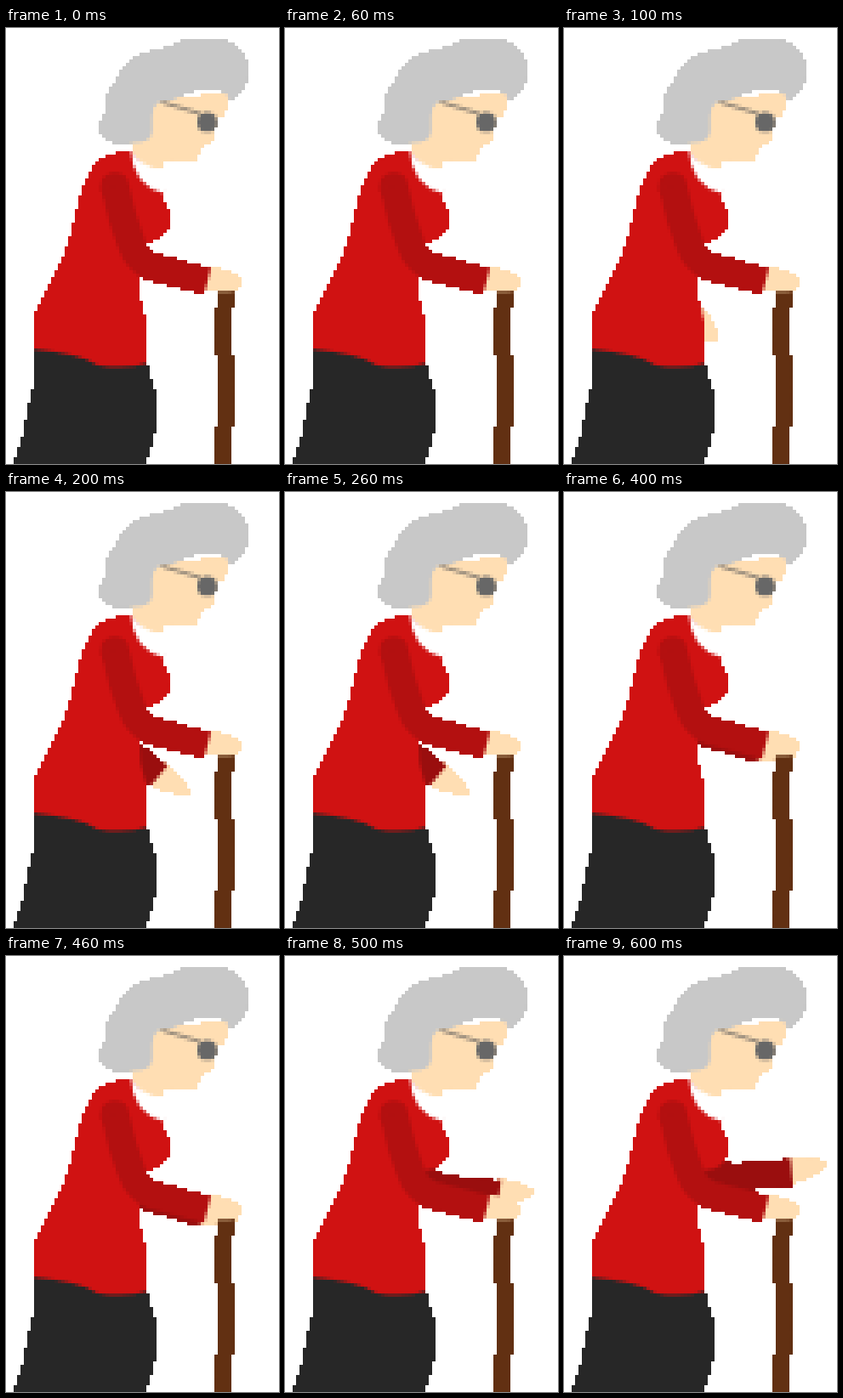
An HTML page with a canvas that plays this animation: 321 px wide and 513 px high, repeating every 700 ms.

```html
<!DOCTYPE html>
<html lang="en">
<head>
<meta charset="utf-8">
<title>Woman with a cane</title>
<style>
html, body { margin: 0; width: 100%; height: 100%; overflow: hidden; background: #fff; }
canvas { position: absolute; left: 1px; top: 1px; width: 320px; height: 512px; image-rendering: pixelated; }
</style>
</head>
<body>
<canvas id="stage" width="80" height="128"></canvas>
<script>
const canvas = document.getElementById('stage');
const ctx = canvas.getContext('2d', { willReadFrequently: true });
const CELL = 4;
const STEP = 100;
const POSES = 7;
const SWING = 11; // degrees the far arm rises per pose
const REST = 19.3; // turn from the raised pose to the near arm's pose
const SHOULDER = [125, 185];
const SKIN = '#ffdeb3';

const hair = 'M212 12H250Q285 18 286 50Q286 74 264 85L258 76Q225 66 195 85L180 87Q171 92 172 105V122Q170 135 152 135H124Q109 132 109 116Q109 106 117 100V80Q128 66 134 50Q148 28 188 22Z';
const face = 'M165 85L262 76Q262 94 256 104L248 108 244 124V134L230 140Q230 150 222 157 205 161 188 155L182 165Q160 168 148 148V100Z';
const collar = 'M147 144Q158 163 182 166H187V195Q148 186 147 144Z';
const torso = 'M146 144Q108 146 97 172 88 190 82 215L72 255 68 267 34 333V400H165V345L158 318 157 292 165 252Q193 250 193 225 192 207 186 204V193Z';
const skirt = 'M33 378Q85 382 108 397 140 403 167 394 169 415 177 430V468Q173 495 163 513H9Q23 475 29 430L33 420Z';
const sleeve = 'M128 186Q136 225 148 255 155 275 172 281L237 298';
const cane = 'M259 306V313L255 345 259 425 255 513';
const nearHand = 'M236 281Q250 279 258 285 280 288 277 304 274 310 262 310H230Z';
const farHand = 'M262 236Q300 234 309 243 311 250 295 257 285 268 262 268Z';

function fill(path, color) {
  ctx.fillStyle = color;
  ctx.fill(new Path2D(path));
}

function line(path, color, width) {
  ctx.strokeStyle = color;
  ctx.lineWidth = width;
  ctx.stroke(new Path2D(path));
}

function disc(x, y, radius, color) {
  ctx.fillStyle = color;
  ctx.beginPath();
  ctx.arc(x, y, radius, 0, 2 * Math.PI);
  ctx.fill();
}

function turn(degrees) {
  const [x, y] = SHOULDER;
  ctx.translate(x, y);
  ctx.rotate(degrees * Math.PI / 180);
  ctx.translate(-x, -y);
}

function drawSleeve(color) {
  disc(128, 186, 16.5, color);
  line(sleeve, color, 33);
}

function drawFarArm(angle) {
  ctx.save();
  turn(angle);
  fill(farHand, SKIN);
  turn(-REST);
  drawSleeve('#9a0e0e');
  ctx.restore();
}

// Give the silhouette hard pixel edges, keeping inner edges soft.
function hardenEdges() {
  const image = ctx.getImageData(0, 0, canvas.width, canvas.height);
  for (let i = 3; i < image.data.length; i += 4) {
    image.data[i] = image.data[i] < 128 ? 0 : 255;
  }
  ctx.putImageData(image, 0, 0);
}

function draw(pose) {
  ctx.setTransform(1, 0, 0, 1, 0, 0);
  ctx.clearRect(0, 0, canvas.width, canvas.height);
  ctx.scale(1 / CELL, 1 / CELL);
  ctx.translate(-1, -1);

  if (pose > 0) drawFarArm(SWING * (POSES - 1 - pose));
  fill(face, SKIN);
  fill(hair, '#c8c8c8');
  line('M183 87L229 101', '#746f68', 3);
  disc(236.5, 110.5, 11.5, '#676767');
  fill(torso, '#d01212');
  fill(collar, '#fff');
  fill(skirt, '#272727');
  line(cane, '#623012', 20);
  fill(nearHand, SKIN);
  drawSleeve('#b31010');
  hardenEdges();
}

let shown = -1;
function tick() {
  const pose = Math.floor(performance.now() / STEP) % POSES;
  if (pose !== shown) draw(shown = pose);
  requestAnimationFrame(tick);
}
tick();
</script>
</body>
</html>
```
